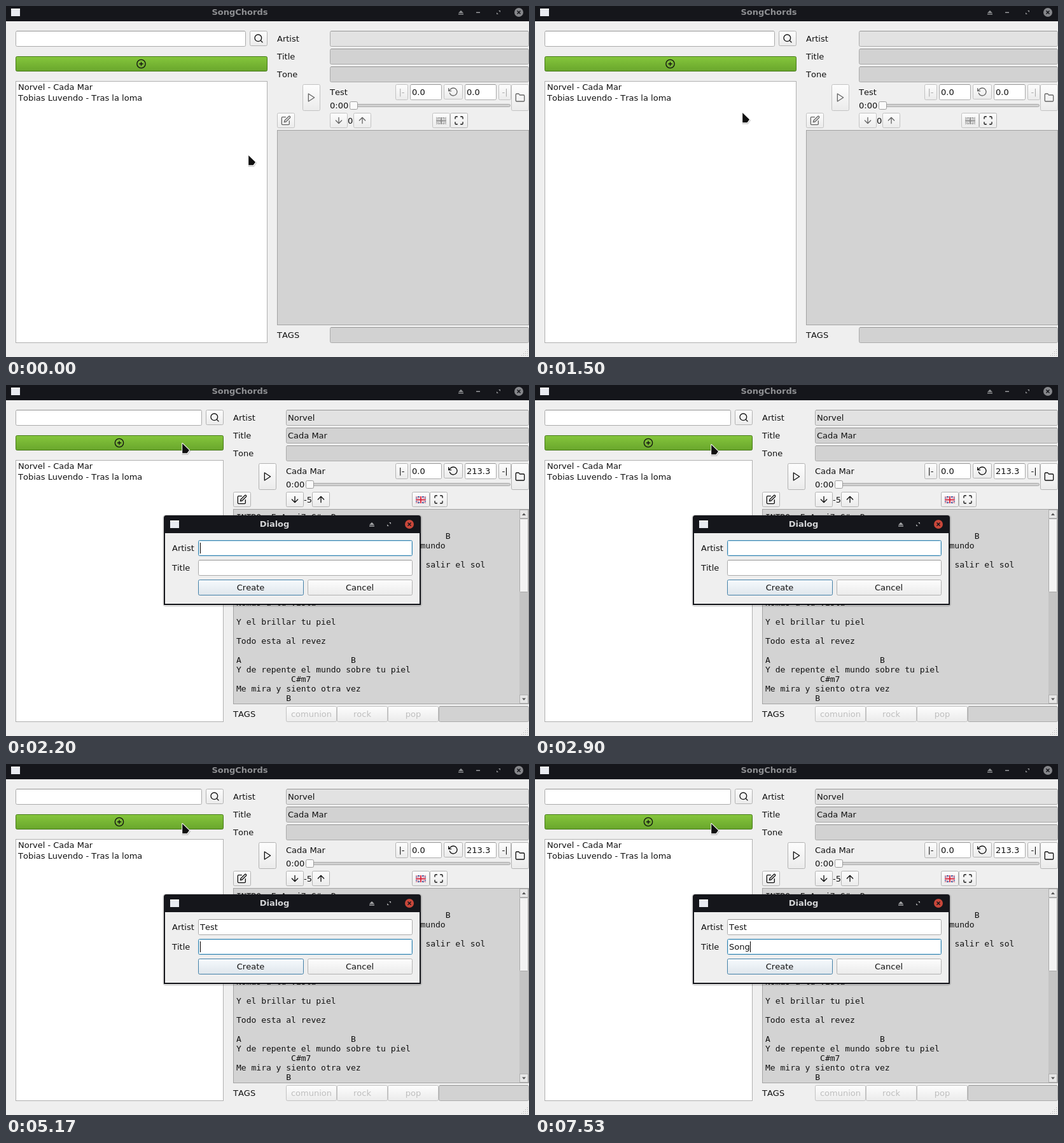
Recreate the animation shown at these times as an HTML page. Size 822x552 px, loop 8 s.

```html
<!DOCTYPE html>
<html lang="en">
<head>
<meta charset="utf-8">
<title>SongChords</title>
<style>
  html, body { margin: 0; width: 100%; height: 100%; overflow: hidden; background: #efefef; }
  svg { display: block; }
  text { font: 13px "DejaVu Sans", sans-serif; font-kerning: none; white-space: pre; }
  .bold { font-weight: bold; }
  .mono { font-family: "DejaVu Sans Mono", monospace; }
  .icon { fill: none; stroke-width: 2; stroke-linecap: round; stroke-linejoin: round; }
</style>
</head>
<body>
<svg width="822" height="552" viewBox="0 0 822 552">
  <defs>
    <linearGradient id="button" x2="0" y2="1"><stop stop-color="#fdfdfd"/><stop offset="1" stop-color="#ebebeb"/></linearGradient>
    <linearGradient id="primary" x2="0" y2="1"><stop stop-color="#f6fafd"/><stop offset="1" stop-color="#dfe6ec"/></linearGradient>
    <linearGradient id="green" x2="0" y2="1"><stop stop-color="#85c63c"/><stop offset="1" stop-color="#69a62c"/></linearGradient>
    <linearGradient id="hover" x2="0" y2="1"><stop stop-color="#8bd040"/><stop offset="1" stop-color="#6fae2f"/></linearGradient>
  </defs>
  <g id="stage"></g>
</svg>
<script>
const LOOP = 8000;
const ARTIST = 'Norvel', SONG = 'Cada Mar';
const SONGS = [`${ARTIST} - ${SONG}`, 'Tobias Luvendo - Tras la loma'];
const INK = '#111', FADED = '#666', DARK = '#15161b';

// Baseline, column, text
const LYRICS = [
  [212, 0, 'INTRO: E Amaj7 C#m B'], [242, 42, 'B'], [257, 37, 'mundo'],
  [287, 38, 'salir el sol'], [347, 0, 'Nomas a tu vista'],
  [377, 0, 'Y el brillar tu piel'], [407, 0, 'Todo esta al revez'],
  [437, 0, 'A                      B'], [452, 0, 'Y de repente el mundo sobre tu piel'],
  [467, 11, 'C#m7'], [482, 0, 'Me mira y siento otra vez'], [497, 10, 'B']
];

// Icons on a 24 unit grid
const ICONS = {
  search: 'M19 11a8 8 0 1 1-16 0a8 8 0 1 1 16 0M21 21l-4.35-4.35',
  plus: 'M22 12a10 10 0 1 1-20 0a10 10 0 1 1 20 0M12 8v8M8 12h8',
  play: 'M5 3l14 9-14 9z',
  edit: 'M11 4H4a2 2 0 0 0-2 2v14a2 2 0 0 0 2 2h14a2 2 0 0 0 2-2v-7M18.5 2.5a2.1 2.1 0 0 1 3 3L12 15l-4 1 1-4z',
  down: 'M12 5v14M19 12l-7 7-7-7',
  up: 'M12 19V5M5 12l7-7 7 7',
  reset: 'M1 4v6h6M3.5 15a9 9 0 1 0 2.1-9.4L1 10',
  folder: 'M22 19a2 2 0 0 1-2 2H4a2 2 0 0 1-2-2V5a2 2 0 0 1 2-2h5l2 3h9a2 2 0 0 1 2 2z',
  expand: 'M8 3H5a2 2 0 0 0-2 2v3m18 0V5a2 2 0 0 0-2-2h-3m0 18h3a2 2 0 0 0 2-2v-3M3 16v3a2 2 0 0 0 2 2h3'
};

const rect = (x, y, w, h, fill) => `<rect x="${x}" y="${y}" width="${w}" height="${h}" fill="${fill}"/>`;
const path = (d, attrs) => `<path d="${d}" ${attrs}/>`;
const text = (x, y, s, fill = INK, attrs = '') => `<text x="${x}" y="${y}" fill="${fill}" ${attrs}>${s}</text>`;
const centered = (x, y, s, fill, cls = '') => text(x, y, s, fill, `text-anchor="middle" class="${cls}"`);
const box = (x, y, w, h, fill, line = '#ababab', r = 2) =>
  `<rect x="${x + .5}" y="${y + .5}" width="${w - 1}" height="${h - 1}" rx="${r}" fill="${fill}" stroke="${line}"/>`;
const icon = (name, x, y, color = INK) =>
  path(ICONS[name], `class="icon" stroke="${color}" transform="translate(${x - 8} ${y - 8}) scale(.6667)"`);
const button = (x, y, w, h, name, on = true) =>
  box(x, y, w, h, 'url(#button)', on ? '#b2b2b2' : '#c2c2c2') +
  (name ? icon(name, x + w / 2, y + h / 2, on ? INK : FADED) : '');
const field = (x, y, w, fill = '#fff') => box(x, y, w, 25, fill) + rect(x + 2, y, w - 4, 1, '#969696');

function titleBar(left, cx, cy, close, eject, title, active) {
  const gray = active ? '#a9aaac' : '#909194';
  return rect(left, cy - 6, 14, 12, '#e9ebf1') + rect(left, cy - 6, 14, 2, '#fff') +
    centered(cx, cy + 4, title, active ? '#d3d4d6' : '#8e8f92', 'bold') +
    path(`M${eject - 4} ${cy + 1}l4-4 4 4zM${eject - 4} ${cy + 2}h8v1.5h-8z`, `fill="${gray}"`) +
    path(`M${close - 32} ${cy - 3}h3v3zM${close - 35} ${cy}v3h3z`, `fill="${gray}"`) +
    `<circle cx="${close}" cy="${cy}" r="7" fill="${active ? '#c9473a' : '#85868a'}"/>` +
    path(`M${close - 2.5} ${cy - 2.5}l5 5m0-5l-5 5`, `stroke="${DARK}" stroke-width="1.5"`);
}

function flag(x, y, on) {
  const [blue, white, red] = on ? ['#34478f', '#fff', '#d32840'] : ['#a3a3a3', '#eee', '#8d8d8d'];
  const diagonal = 'M0 0L16 11M16 0L0 11', cross = 'M8 0V11M0 5.5H16';
  const stroke = (d, color, w) => path(d, `stroke="${color}" stroke-width="${w}"`);
  return `<g transform="translate(${x} ${y})">${rect(0, 0, 16, 11, blue)}` +
    stroke(diagonal, white, 2.2) + stroke(diagonal, red, .8) +
    stroke(cross, white, 4) + stroke(cross, red, 2) + '</g>';
}

function songText() {
  const arrow = (y, d) => box(807, y, 14, 14, '#e6e6e6', '#b0b0b0', 0) + path(d, 'fill="#555"');
  return LYRICS.map(([y, col, s]) => text(362 + col * 7.826, y, s, INK, 'class="mono"')).join('') +
    rect(807, 196, 14, 305, '#c4c4c4') + box(807, 210, 14, 116, '#f3f3f3', '#a9a9a9', 1) +
    arrow(196, 'M811 205l3-3.5 3 3.5z') + arrow(487, 'M811 492.5l3 3.5 3-3.5z');
}

function mainWindow(loaded, active, hover) {
  const left = loaded ? 342 : 411;   // right edge of the song list pane
  const x = left + 15, v = x + 83;   // label and value columns
  const soft = '#d2d2d2';
  const barText = loaded ? INK : '#aaa';
  const steps = loaded ? 481 : 546, tools = loaded ? 638 : 670;
  let s = rect(0, 0, 822, 552, '#efefef') + rect(0, 0, 822, 24, DARK) +
    titleBar(8, 367.5, 10, 806, 715, 'SongChords', active) + rect(739, 9.5, 6, 1.5, '#999a9d');

  s += field(15, 39, left - 49) + button(left - 28, 39, 28, 24, 'search') +
    box(15, 79, left - 15, 24, `url(#${hover ? 'hover' : 'green'})`, '#477a1b') +
    icon('plus', (left + 15) / 2 - .5, 91) +
    box(15, 118, left - 15, 412, '#fff', '#b0b0b0', 0) +
    SONGS.map((song, i) => text(19, 132 + 17 * i, song)).join('');

  s += ['Artist', 'Title', 'Tone'].map((label, i) =>
    text(x, 56 + 28 * i, label) + field(v, 39 + 28 * i, 822 - v, i ? soft : '#e2e2e2')).join('');
  if (loaded) s += text(443, 56, ARTIST) + text(443, 84, SONG);

  s += button(x + 40, 123, 28, 42, 'play', loaded) + text(v, 140, loaded ? SONG : 'Test') +
    button(612, 123, 20, 25, '', loaded) + centered(622, 140, '|-', barText) +
    field(635, 123, 50) + text(638, 140, '0.0') +
    button(688, 123, 30, 24, 'reset', loaded) +
    field(721, 123, 50) + text(724, 140, loaded ? '213.3' : '0.0') +
    button(774, 123, 20, 25, '', loaded) + centered(784, 140, '-|', barText) +
    button(794, 123, 28, 42, 'folder', loaded);

  s += text(v, 161, '0:00') + box(v + 35, 154, 793 - v - 35, 5, '#d0d0d0', '#ababab') +
    box(v + 31, 150, 13, 13, '#fafafa', '#9c9c9c');

  s += button(x, 168, 28, 24, 'edit', loaded) + button(v, 168, 28, 24, 'down', loaded) +
    text(v + 28, 185, loaded ? '-5' : '0') + button(steps, 168, 28, 24, 'up', loaded) +
    button(tools, 168, 28, 24, '', loaded) + flag(tools + 6, 175, loaded) +
    button(tools + 28, 168, 28, 24, 'expand');

  s += box(x, 195, 822 - x, 307, '#d3d3d3', '#a3a3a3', 0) + text(x, 522, 'TAGS');
  if (loaded) {
    s += songText() + ['comunion', 'rock', 'pop'].map((tag, i) =>
      button(440 + 80 * i, 505, 80, 25, '', false) + centered(480 + 80 * i, 522, tag, '#bebebe')).join('');
  }
  s += field(loaded ? 680 : v, 505, loaded ? 142 : 822 - v, soft);
  for (let i = 0; i < 4; i++)
    for (let j = 0; j <= i; j++) s += rect(819 - 3 * j, 540 + 3 * i, 1, 1, '#b0b0b0');
  return s;
}

const pen = document.createElement('canvas').getContext('2d');
pen.font = '13px "DejaVu Sans", sans-serif';
pen.fontKerning = 'none';

function dialog(artist, title, onTitle, caret) {
  const input = (y, value, focused) =>
    (focused ? box(302, y, 337, 25, '#fff', '#3684b0') + box(303, y + 1, 335, 23, 'none', '#c3e0ef', 1)
             : field(302, y, 337)) +
    text(305, y + 17, value) +
    (focused && caret ? rect(305 + Math.round(pen.measureText(value).width), y + 4, 1, 17, '#000') : '');
  return '<rect x="246" y="204" width="408" height="145" rx="5" fill="#000" opacity=".12"/>' +
    path('M248 346V209q0-4 4-4H648q4 0 4 4V346z', `fill="${DARK}"`) +
    rect(250, 233, 400, 111, '#efefef') +
    titleBar(258, 422, 219, 634, 575, 'Dialog', true) +
    text(261, 261, 'Artist') + input(244, artist, !onTitle) +
    text(261, 292, 'Title') + input(275, title, onTitle) +
    box(302, 306, 166, 25, 'url(#primary)', '#4481a8') + centered(384.5, 323, 'Create', INK) +
    button(474, 306, 165, 25) + centered(556, 323, 'Cancel', INK);
}

function pointer(x, y) {
  const shape = 'M1.2 2V17.3H8.5L12 12.4z';
  return `<g transform="translate(${x} ${y})">` +
    path(shape, 'transform="translate(.7 1.5)" stroke="#000" stroke-width="2.5" opacity=".16"') +
    path(shape, 'fill="#101010" stroke="#fff" stroke-width="2" stroke-linejoin="round" paint-order="stroke"') + '</g>';
}

const passed = (t, times) => times.filter(at => t >= at).length;
const ease = p => p * p * (3 - 2 * p);

function pointerAt(t) {
  const glide = (a, b, p) => a.map((from, i) => Math.round(from + (b[i] - from) * p));
  if (t < 1300) {
    const step = Math.max(0, Math.min(7, Math.floor((t - 700) / 33.3 + 1.02)));
    return glide([380, 233], [351, 207], step / 7);
  }
  if (t < 2600) return glide([351, 207], [276, 90], ease(passed(t, [1300, 1400, 1530, 1630, 1730]) / 5));
  return [276, t < 2730 ? 91 : 92];
}

function scene(t) {
  const open = t >= 2200;
  const [x, y] = pointerAt(t);
  const artist = 'Test'.slice(0, passed(t, [3730, 4070, 4370, 4530]));
  const title = 'Song'.slice(0, passed(t, [6130, 6430, 6670, 7530]));
  const caret = passed(t, [2900, 3470, 7400, 7530]) % 2 === 0;
  return mainWindow(open, t >= 1870 && !open, y < 103 && !open) +
    (open ? dialog(artist, title, t >= 5170, caret) : '') + pointer(x, y);
}

const stage = document.getElementById('stage');
let shown = '';
function tick() {
  const next = scene(performance.now() % LOOP);
  if (next !== shown) stage.innerHTML = shown = next;
  requestAnimationFrame(tick);
}
tick();
</script>
</body>
</html>
```
